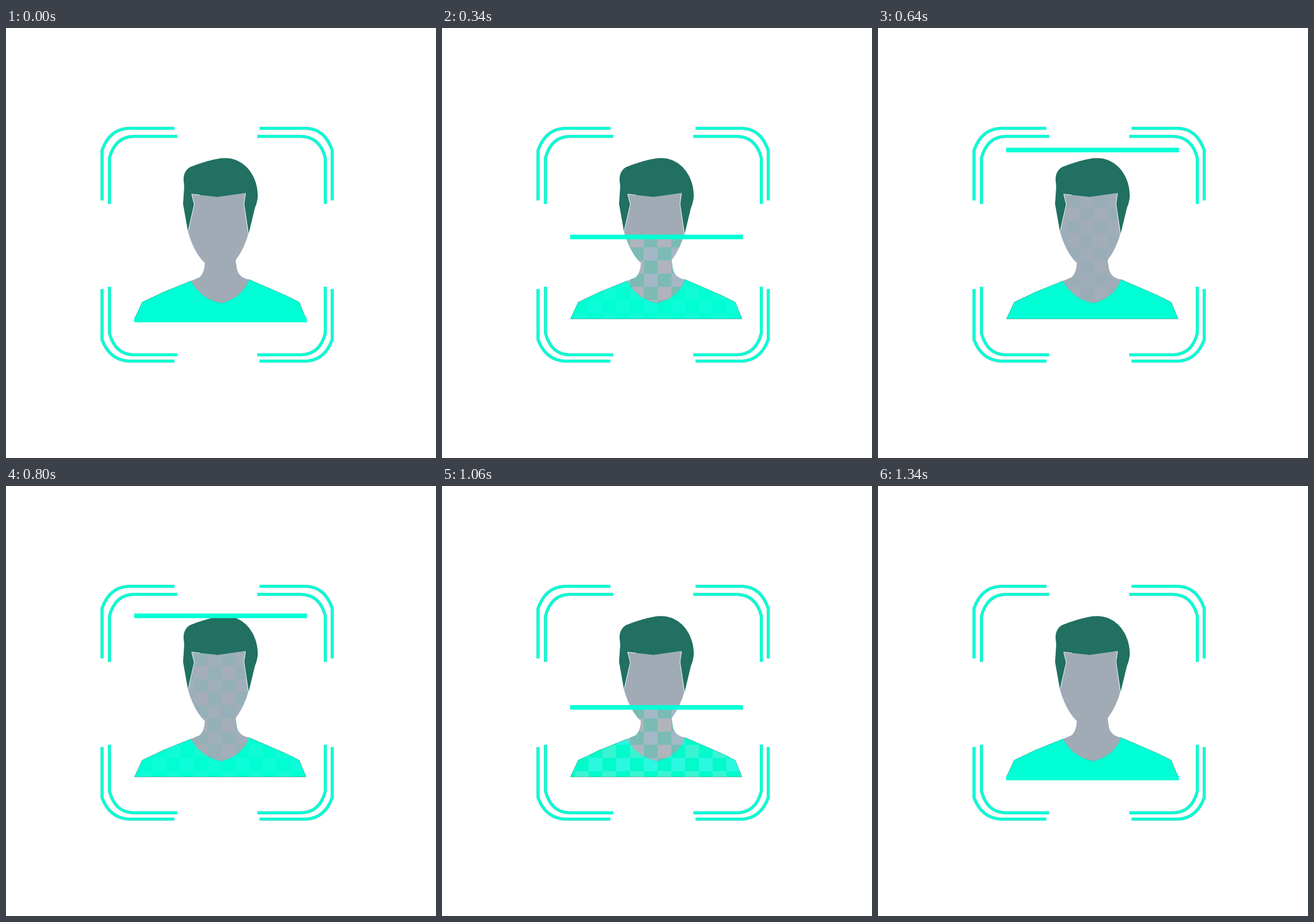
Recreate the animation shown at these times as an HTML page. Size 748 px wide and 748 px high, loop 1360 ms.

```html
<!DOCTYPE html>
<html lang="en">
<head>
<meta charset="utf-8">
<title>Face scan</title>
<style>
  html, body { margin: 0; width: 100%; height: 100%; overflow: hidden; background: #fff; }
  svg { display: block; width: 100%; height: 100%; }
</style>
</head>
<body>
<svg viewBox="0 0 748 748">
  <defs>
    <path id="skin" d="M323 289 L368 294 L417 287 L414 306 L421.500 358 Q415 383 399.500 404 L401.500 418 Q404 434 422.500 437.500 Q412 468 375 478.500 Q340 472 322 440 L337 433.500 Q345 426 346 409 Q327 391 316.500 354 L327.500 307 Z"/>
    <path id="shirt" d="M322 440 L275 459 L237 477 L223.500 506 L522 506 L510 477 L486 465 L422.500 437.500 Q412 468 375 478.500 Q340 472 322 440 Z"/>
    <pattern id="mosaic" x="351" y="404.400" width="47.900" height="45.800" patternUnits="userSpaceOnUse">
      <rect width="47.900" height="45.800" fill="rgb(10,235,175)"/>
      <rect x="23.950" width="23.950" height="22.900" fill="rgb(225,210,207)"/>
      <rect y="22.900" width="23.950" height="22.900" fill="rgb(170,226,255)"/>
    </pattern>
    <clipPath id="scanned"><rect id="mask" x="200" width="350" height="400"/></clipPath>
    <g id="frame">
      <path d="M293 174.500 H213 Q180 176 167 213 V300"/>
      <path d="M298 188.500 H222 Q190 189 180 226 V306"/>
      <path d="M441 174.500 H523 Q555 176 567.500 213 V300"/>
      <path d="M437 188.500 H513 Q546 189 555.500 226 V306"/>
      <path d="M293 579.500 H213 Q180 577 167 542 V454"/>
      <path d="M298 568.500 H222 Q190 568 180 531 V450"/>
      <path d="M441 579.500 H523 Q555 577 567.500 542 V454"/>
      <path d="M437 568.500 H513 Q546 568 555.500 531 V450"/>
    </g>
  </defs>
  <rect width="748" height="748" fill="#fff"/>
  <g fill="none">
    <use href="#frame" stroke="#0b8f7a" stroke-opacity=".5" stroke-width="5.500"/>
    <use href="#frame" stroke="#00ffd5" stroke-width="4.700"/>
  </g>
  <use href="#shirt" fill="#00ffd5" stroke="#0b8f7a" stroke-width=".6"/>
  <use href="#skin" fill="#a0abb6"/>
  <path fill="#217061" d="M320 242 Q350 230 374 226.500 Q390 225 402 230.500 Q421 239 431 260 Q438 275 438 293 Q437 304 433 313 L422 358.500 L414 306 L417 287 L368 294 L323 289 L327.500 307 L316.500 354 L308 306 L310 276 L308.800 263 Q309 249 320 242 Z"/>
  <path fill="none" stroke="#fff" stroke-width=".9" d="M416.500 288 L414 306 L421.500 357 M337 290.500 L323 289 L327.500 307 L317 353"/>
  <g clip-path="url(#scanned)" fill="url(#mosaic)">
    <use id="skinTiles" href="#skin"/>
    <use id="shirtTiles" href="#shirt"/>
  </g>
  <rect id="bar" x="223" width="300.500" height="8" fill="#00ffd5"/>
</svg>
<script>
  const LOOP = 1360, STEP = 20, TURN = 700, END = 1340;
  const LOW = 508, HIGH = 206, STRENGTH = 0.45;
  const $ = id => document.getElementById(id);
  const bar = $('bar'), mask = $('mask'), skin = $('skinTiles'), shirt = $('shirtTiles');
  const ease = p => p * p * (3 - 2 * p);

  function draw(t) {
    const rising = t < TURN;
    // 1 at the bottom of the sweep, 0 at the top
    const p = rising ? 1 - t / TURN : Math.min(1, (t - TURN) / (END - TURN));
    const y = HIGH + (LOW - HIGH) * ease(p);
    bar.setAttribute('y', y - 4);
    mask.setAttribute('y', y);
    skin.setAttribute('opacity', STRENGTH * p);
    shirt.setAttribute('opacity', STRENGTH * (rising ? 0.6 * p * p : p));
  }

  const start = performance.now();
  function tick() {
    const t = (performance.now() - start) % LOOP;
    draw(Math.floor(t / STEP) * STEP);
    requestAnimationFrame(tick);
  }
  draw(0);
  requestAnimationFrame(tick);
</script>
</body>
</html>
```
